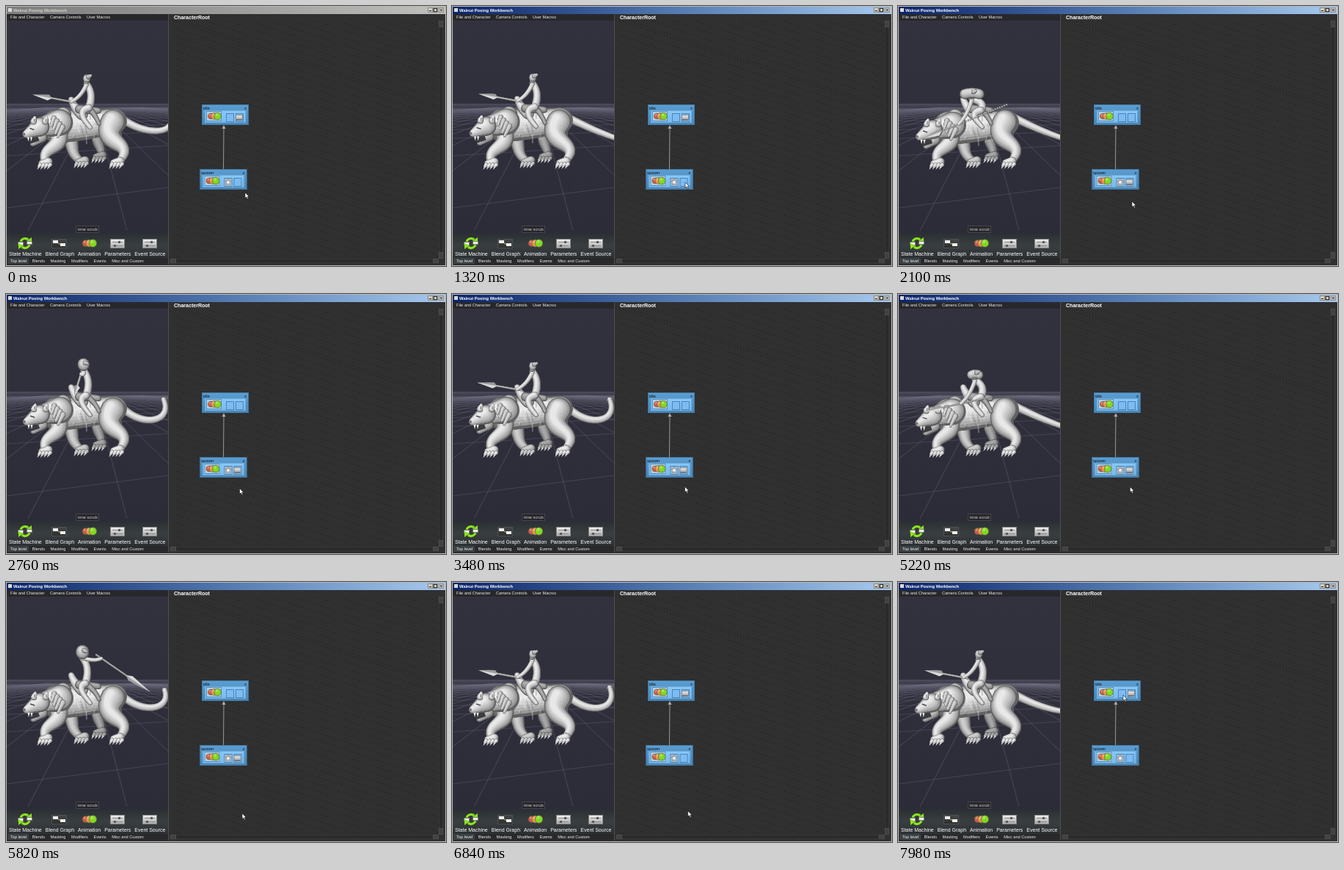
An HTML page with a canvas that plays this animation: 600x354 px, repeating every 8 s.

```html
<!DOCTYPE html>
<html lang="en">
<head>
<meta charset="utf-8">
<title>Animation editor</title>
<style>
html, body { margin: 0; width: 100%; height: 100%; overflow: hidden; background: #2f2f2f; }
canvas { display: block; width: 600px; height: 354px; }
</style>
</head>
<body>
<canvas id="stage" width="600" height="354"></canvas>
<script>
const ctx = document.getElementById('stage').getContext('2d');
const LOOP = 8000, STEP = 60, SPAWN = 1860, SPAWN_STARTS = [1710, 4980], FOCUS_AT = 420, IDLE_LEAD = 750;
const SANS = '"Liberation Sans", Arial, sans-serif';

// Key points as [time, x, y]; motion eases from one to the next.
const CURSOR = [[0, 326, 254], [840, 376, 254], [960, 378, 270], [1260, 318, 240], [1710, 318, 240],
  [2100, 319, 266], [4200, 317, 261], [4500, 314, 240], [4980, 314, 240], [5640, 322, 315],
  [6780, 322, 315], [7500, 307, 154]];
const SPEAR_TIP = [[0, 36, 120], [390, 36, 180], [840, 197, 150], [1240, 4, 128], [SPAWN, 36, 120]];

const lerp = (a, b, k) => a + (b - a) * k;
const lerpPoint = (p, q, k) => [lerp(p[0], q[0], k), lerp(p[1], q[1], k)];
const smooth = (t, from, to) => {
  const k = Math.min(1, Math.max(0, (t - from) / (to - from)));
  return k * k * (3 - 2 * k);
};
const bump = (t, center, width) => Math.exp(-(((t - center) / width) ** 2));

function follow(keys, t) {
  const i = keys.findIndex(key => key[0] > t);
  if (i < 0) return keys[keys.length - 1].slice(1);
  const [a, b] = [keys[i - 1], keys[i]];
  return lerpPoint(a.slice(1), b.slice(1), smooth(t, a[0], b[0]));
}
function seeded(seed) {
  return () => (seed = (seed * 16807) % 2147483647) / 2147483647;
}

function rect(x, y, w, h, fill, stroke) {
  if (fill) { ctx.fillStyle = fill; ctx.fillRect(x, y, w, h); }
  if (stroke) { ctx.strokeStyle = stroke; ctx.lineWidth = 1; ctx.strokeRect(x + .5, y + .5, w - 1, h - 1); }
}
function gradient(x0, y0, x1, y1, ...colors) {
  const g = ctx.createLinearGradient(x0, y0, x1, y1);
  colors.forEach((c, i) => g.addColorStop(i / (colors.length - 1), c));
  return g;
}
function text(s, x, y, size = 5.65, color = '#eee', weight = 'normal') {
  ctx.font = `${weight} ${size}px ${SANS}`;
  ctx.fillStyle = color;
  ctx.fillText(s, x, y);
}
// Labels in a row, each after the width of the one before it.
function labels(names, x, y, gap, size, color) {
  for (const name of names) {
    text(name, x, y, size, color);
    x += ctx.measureText(name).width + gap;
  }
}
function line(points, color, width = 1) {
  ctx.beginPath();
  points.forEach(([x, y]) => ctx.lineTo(x, y));
  ctx.strokeStyle = color;
  ctx.lineWidth = width;
  ctx.stroke();
}
function polygon(points, fill) {
  ctx.beginPath();
  points.forEach(([x, y]) => ctx.lineTo(x, y));
  ctx.closePath();
  ctx.fillStyle = fill;
  ctx.fill();
}
function disc(x, y, r, fill) {
  ctx.beginPath();
  ctx.arc(x, y, r, 0, 7);
  ctx.fillStyle = fill;
  ctx.fill();
}
const gray = v => `rgb(${v},${v},${v})`;

function bezier(points, k) {
  while (points.length > 1) points = points.slice(1).map((p, i) => lerpPoint(points[i], p, k));
  return points[0];
}
// Rounded, tapering body part along a curve, lit from the upper left.
function tube(points, r0, r1, tone = 1) {
  const count = 32, layers = 6;
  for (let layer = 0; layer <= layers; layer++) {
    const depth = layer / layers;
    const color = gray(Math.round(tone * lerp(98, 232, Math.sqrt(depth))));
    for (let i = 0; i <= count; i++) {
      const [x, y] = bezier(points, i / count), r = lerp(r0, r1, i / count);
      disc(x - r * .22 * depth, y - r * .4 * depth, r * (1 - .75 * depth), color);
    }
  }
}

function floor() {
  rect(1, 20, 220, 290, gradient(0, 20, 0, 310, '#32323f', '#2f2f3c', '#2c2c39'));
  rect(1, 133, 220, 12, gradient(0, 133, 0, 145, 'rgba(120,120,138,.4)', 'rgba(80,80,96,0)'));
  for (let k = -16; k <= 16; k++) {
    line([[121 + k * 4, 138], [165 + k * 135, 306]], 'rgba(125,125,142,.5)', .7);
  }
  for (let n = 1; n < 22; n++) {
    const y = 133 + 130 / n;
    line([[0, y + 12 / n], [221, y - 16 / n]], 'rgba(115,115,134,.45)', .7);
  }
}

function paw(x, y, tone) {
  tube([[x + 4, y - 3], [x - 5, y]], 5.5, 5, tone);
  for (let i = 0; i < 4; i++) {
    const px = x - 9 + i * 4.5;
    tube([[px + 2, y + 1], [px, y + 3]], 2.4, 1.6, tone);
    polygon([[px - 1, y + 2], [px + 1.5, y + 4], [px - 2.5, y + 8]], '#cfcfcf');
  }
}
function leg(points, r0, r1, tone = 1) {
  tube(points, r0, r1, tone);
  paw(...points[points.length - 1], tone);
}

// Short strokes that break up the surface like modelled muscle.
function facets() {
  const random = seeded(77);
  for (let i = 0; i < 60; i++) {
    const x = 62 + random() * 96, y = 146 + random() * 30, length = 3 + random() * 9;
    const color = random() < .5 ? 'rgba(60,60,66,.22)' : 'rgba(250,250,250,.3)';
    line([[x, y], [x + length * (random() - .5), y + length]], color, 1 + random() * 1.5);
  }
}

function head() {
  tube([[74, 158], [48, 165]], 18, 13);
  for (let i = 0; i < 4; i++) {
    tube([[66 + i * 4, 152 + i * 4], [62 + i * 3, 163 + i * 5]], 3.5, 1.5, .92);
  }
  tube([[50, 178], [37, 187]], 7, 3.5, .85);
  polygon([[28, 179], [44, 177], [46, 183], [34, 187]], '#3b3b41');
  tube([[47, 164], [28, 174]], 13, 5);
  for (const [x, y] of [[38, 153], [54, 153]]) {
    tube([[x, y + 4], [x + 2, y - 2]], 4, 1.6);
    line([[x + 1, y + 4], [x + 1, y]], '#8a8a8e', 1.4);
  }
  line([[33, 166], [39, 168]], '#4b4b51', 1.5);
  disc(25, 174, 2, '#77777c');
  for (const x of [31, 35]) polygon([[x - 1.5, 178], [x + 1.5, 178], [x, 184]], '#f4f4f4');
}

function beast(curl, crouch, breath) {
  const low = [[154, 150], [178, 162], [204, 174], [230, 182]];
  const raised = [[154, 150], [182, 183], [228, 176], [215, 144]];
  tube(low.map((p, i) => lerpPoint(p, raised[i], curl)), 6, 3.6);
  leg([[130, 168], [116, 184], [136, 196], [128, 206]], 10, 4, .72);
  leg([[84, 168], [94, 194], [86, 200], [104, 213]], 11, 5, .88);

  ctx.save();
  ctx.translate(0, crouch * 3 + breath);
  tube([[70, 163], [98, 163], [124, 160], [148, 156]], 23, 17);
  tube([[78, 148], [74, 168]], 11, 12);
  facets();
  ctx.restore();

  leg([[146, 158], [124, 190], [182, 184], [152, 214]], 17, 4.5);
  leg([[70, 170], [82, 196], [44, 190], [54, 215]], 13, 5);
  ctx.save();
  ctx.translate(crouch - breath, crouch * 4 + breath);
  head();
  ctx.restore();
}

function spear(hand, tip, crouch) {
  const dx = tip[0] - hand[0], dy = tip[1] - hand[1], length = Math.hypot(dx, dy) || 1;
  const at = (k, side = 0) => [hand[0] + dx * k - dy / length * side, hand[1] + dy * k + dx / length * side];
  tube([at(-.1 - 1.3 * crouch), at(.7)], 1.3, 1.3, .85);
  polygon([at(.5), at(.58, 4), at(.72, 3), at(1), at(.6, -4)], '#9d9d9d');
  polygon([at(.5), at(.6, -4), at(1)], '#dadada');
}

function rider(time, crouch, lift) {
  const hx = 110 - 9 * crouch - 6 * lift, hy = 99 + 21 * crouch - 3 * lift;
  const hip = [113 - 5 * lift, 138 + 4 * crouch], neck = [hx, hy + 7];
  const tip = follow(SPEAR_TIP, time);
  const hand = lerpPoint(neck, tip, .28);
  hand[1] += 20 - 34 * lift;
  const elbow = [(neck[0] + hand[0]) / 2 + 3, (neck[1] + hand[1]) / 2 + 5];

  tube([[89, 127], [94, 140], [104, 147]], 4, 8);
  tube([[100, 140], [126, 142]], 6, 4, .75);
  tube([hip, [122, 148], [127, 160]], 4, 2.5, .75);
  tube([hip, [hip[0] + 7, (hip[1] + hy) / 2], neck], 5.5, 4.5);
  tube([hip, [96, 142 + 4 * crouch], [107, 156], [115, 165]], 5, 3);
  spear(hand, tip, crouch);
  tube([neck, elbow, hand], 3, 2.2);
  const hair = 4.5 * (1 + crouch * .5 + lift);
  const spread = 10 * crouch;
  tube([[hx, hy + 2], [hx - 1, hy + 4]], 3.6, 2.6, .9);
  tube([[hx - spread, hy], [hx, hy - 3], [hx + spread, hy]], hair, hair, .93);
  tube([[hx + 2, hy - 3], [hx + 6, hy - 5 + 4 * lift]], 3, 1.2, .85);
}

function viewport(t, state) {
  const { spawning, elapsed } = state;
  const time = spawning ? elapsed : 0;
  const crouch = spawning ? bump(time, 390, 190) : 0;
  const lift = spawning ? bump(time, 900, 260) : 0;
  const curl = spawning ? smooth(time, 350, 950) : 1 - smooth(elapsed, 0, 1500);
  const breath = spawning ? 0 : .6 * Math.sin(elapsed / 420);
  ctx.save();
  ctx.beginPath();
  ctx.rect(1, 20, 220, 290);
  ctx.clip();
  floor();
  beast(curl, crouch, breath);
  ctx.translate(0, breath);
  rider(time, crouch, lift);
  ctx.restore();
  rect(95, 299, 32, 10, '#25252a', '#45454d');
  text('time scrub', 98, 306, 5.8, '#d0d0d0');
}

function trio(x, y, r) {
  ['#d9583f', '#f0924a', '#84d61c'].forEach((color, i) => {
    const cx = x + (i - 1) * r * .95, size = r * (.82 + i * .09);
    disc(cx, y, size + .4, '#5a6a4e');
    disc(cx, y, size - .3, color);
    disc(cx - 1, y - size * .4, size * .4, 'rgba(255,255,255,.3)');
  });
}
function sliders(x, y) {
  rect(x, y, 20, 13, gradient(0, y, 0, y + 13, '#f1f1f1', '#a8a8a8'), '#858585');
  for (const [dy, knob] of [[4, 11], [9, 5]]) {
    rect(x + 3, y + dy, 14, 1, '#888');
    rect(x + knob, y + dy - 1, 3, 3, '#5c5c5c');
  }
}
function cycleIcon(x, y) {
  for (const turn of [0, Math.PI]) {
    ctx.save();
    ctx.translate(x, y);
    ctx.rotate(turn);
    ctx.beginPath();
    ctx.arc(0, 0, 6.5, 3.5, 5.4);
    ctx.strokeStyle = '#8ce41c';
    ctx.lineWidth = 3.2;
    ctx.stroke();
    polygon([[2, -3], [9, -8], [9, 0]], '#8ce41c');
    rect(-10, -2, 8, 5, '#f2f2f2', '#777');
    ctx.restore();
  }
}

function toolbar() {
  rect(1, 310, 220, 33, gradient(0, 310, 0, 343, '#2b3033', '#393e40', '#2c3032'));
  cycleIcon(26, 323);
  rect(62, 317, 21, 13, gradient(0, 317, 0, 330, '#45494b', '#2a2c2d'), '#4d5153');
  line([[68, 321], [73, 324], [78, 325]], '#d4ce53');
  rect(64, 319, 7, 4, '#eee');
  rect(74, 323, 7, 4, '#eee');
  trio(113.5, 323, 5.2);
  sliders(142, 317);
  sliders(186, 317);
  labels(['State Machine', 'Blend Graph', 'Animation', 'Parameters', 'Event Source'], 4, 340, 5, 7, '#fff');
  rect(1, 343, 220, 9, '#29292b');
  rect(2, 343, 29, 8, '#3b4144');
  labels(['Top level', 'Blends', 'Masking', 'Modifiers', 'Events', 'Misc and Custom'], 6, 349, 7.5);
}

function windowFrame(focused) {
  rect(0, 0, 600, 354, '#2f2f2f', '#b9b7b0');
  rect(1, 1, 598, 10, focused ? gradient(1, 0, 599, 0, '#0a246a', '#5279b1', '#a6caf0')
                              : gradient(1, 0, 599, 0, '#7d7d7d', '#9c9c9b', '#c0c0be'));
  rect(3, 3, 5, 5, '#d8d8d8');
  text('Walnut Posing Workbench', 10, 8.2, 5.8, focused ? '#fff' : '#d4d0c8', 'bold');
  for (const x of [575, 582, 590]) rect(x, 2, 7, 7, '#d4d0c8', '#8b8984');
  rect(577, 6, 3, 1, '#111');
  rect(583, 3, 5, 5, null, '#333');
  line([[592, 4], [595, 7]], '#111');
  line([[595, 4], [592, 7]], '#111');
  rect(1, 11, 220, 9, '#28282c');
  labels(['File and Character', 'Camera Controls', 'User Macros'], 6, 17, 7.5);
}

function statusIcon(x, y) {
  rect(x + 1, y + 2, 10, 7, gradient(0, y + 2, 0, y + 9, '#f4f4f4', '#a4a4a4'), '#8a8a8a');
  rect(x + 2, y + 8, 8, 2, '#777');
}
function starIcon(x, y) {
  const points = Array.from({ length: 11 }, (_, i) => {
    const r = i % 2 ? 2 : 4.5, a = i * Math.PI / 5 - Math.PI / 2;
    return [x + r * Math.cos(a), y + r * Math.sin(a)];
  });
  polygon(points, '#f3f3f3');
  line(points, '#73777a', .7);
}
function node(name, x, y, active, star) {
  const slotX = x + 33;
  rect(x, y, 64, 28, gradient(0, y, 0, y + 28, '#5b9dd2', '#4a86b6'), '#4379a3');
  rect(x + 4, y + 8, 56, 17, gradient(0, y + 8, 0, y + 25, '#88c8fb', '#78baf0'), '#6cabdc');
  text(name, x + 1.5, y + 6.8, 6, '#101820');
  text('x', x + 58, y + 6.5, 6, '#101820');
  rect(x + 6, y + 9, 21, 14, '#b0d2ec', '#5b8fb7');
  trio(x + 17, y + 16, 4.8);
  for (const sx of [slotX, slotX + 13]) rect(sx, y + 12, 11, 12, '#7dbcf2', '#4c84b2');
  if (star) {
    rect(slotX + 1, y + 13, 9, 10, '#a9b9c6');
    starIcon(slotX + 5.5, y + 18);
  }
  if (active) statusIcon(slotX + 12, y + 12);
}

function graph(spawning) {
  rect(221, 11, 1, 341, '#505050');
  rect(222, 11, 376, 341, '#303030');
  for (let x = 229; x < 590; x += 4) {
    const slope = Math.floor((x - 229) / 3);
    for (let y = 0; y < 324; y += 10) rect(x, 20 + (y + slope) % 324, 1, 1, '#1c1c1c');
  }
  text('CharacterRoot', 229, 18, 7.05, '#fff', 'bold');
  rect(590, 20, 6, 324, '#2b2b2b', '#363636');
  rect(224, 344, 366, 6, '#2b2b2b', '#363636');
  for (const y of [20, 335]) rect(590, y, 6, 9, '#414141', '#4c4c4c');
  for (const x of [224, 582]) rect(x, 344, 8, 6, '#414141', '#4c4c4c');
  line([[296.5, 222], [297, 164]], '#999');
  polygon([[297, 162], [294.5, 167], [299.5, 167]], '#aaa');
  node('idle', 267, 134, !spawning, false);
  node('spawn', 264.5, 222, spawning, true);
}

function cursor(x, y) {
  const shape = [[0, 0], [0, 7.5], [1.8, 6], [3.1, 9], [4.4, 8.4], [3.2, 5.5], [5.5, 5.4]]
    .map(([dx, dy]) => [x + dx, y + dy]);
  polygon(shape, '#fff');
  line([...shape, shape[0]], '#111', .6);
}

// Which state plays, and for how long it has been playing.
function stateAt(t) {
  const start = SPAWN_STARTS.filter(s => s <= t).pop();
  if (start === undefined) return { spawning: false, elapsed: t + IDLE_LEAD };
  const elapsed = t - start;
  return elapsed < SPAWN ? { spawning: true, elapsed } : { spawning: false, elapsed: elapsed - SPAWN };
}

function draw(t) {
  const state = stateAt(t);
  windowFrame(t >= FOCUS_AT);
  viewport(t, state);
  toolbar();
  graph(state.spawning);
  cursor(...follow(CURSOR, t));
}

const origin = performance.now();
function tick() {
  const t = (performance.now() - origin) % LOOP;
  draw(Math.floor(t / STEP) * STEP);
  requestAnimationFrame(tick);
}
tick();
</script>
</body>
</html>
```
